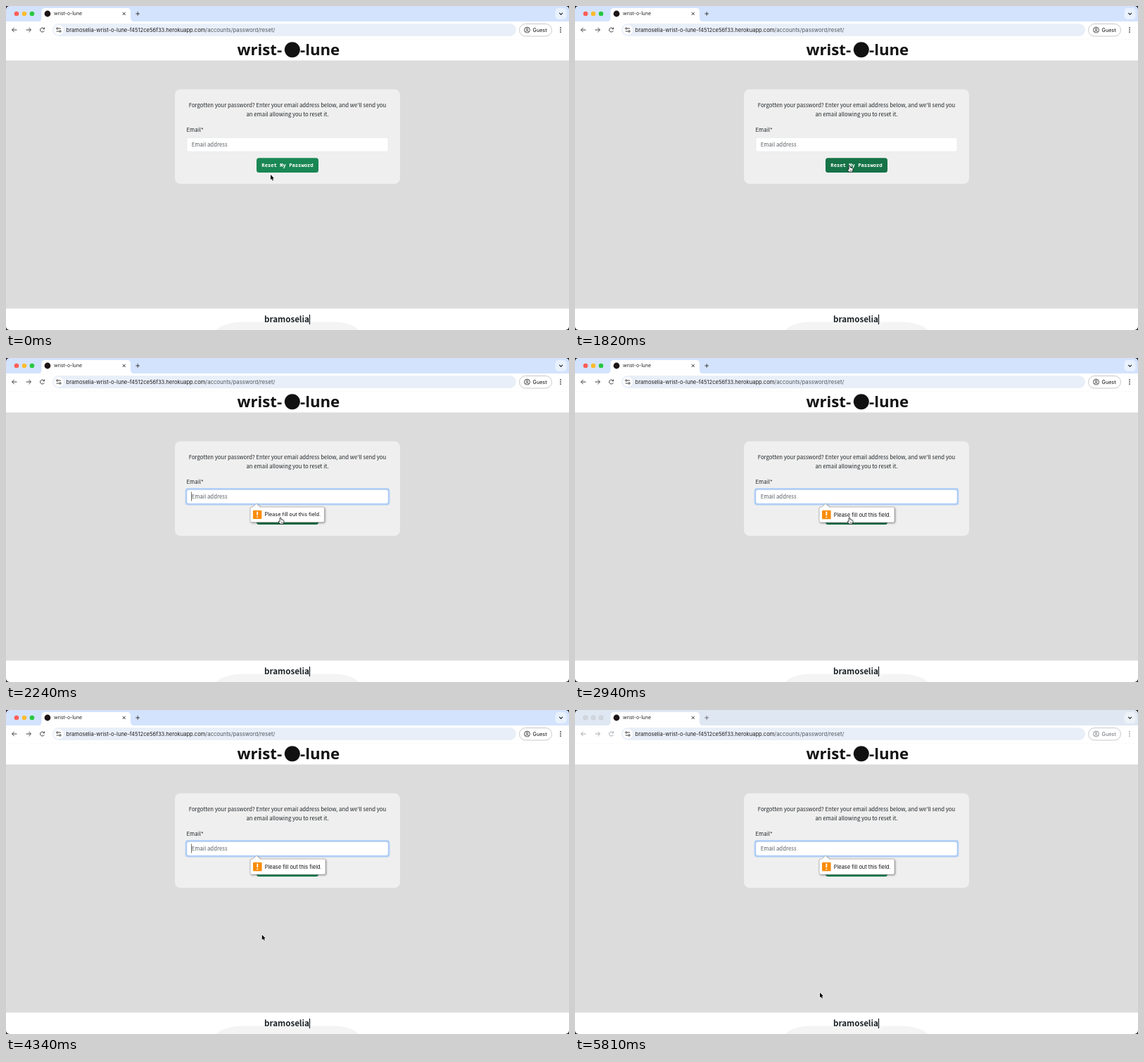
Write an HTML page with a canvas that moves like this. It is 800 by 461 pixels and loops after 5880 ms.

```html
<!DOCTYPE html>
<html lang="en">
<head>
<meta charset="utf-8">
<title>wrist-o-lune</title>
<style>
html, body { margin: 0; width: 100%; height: 100%; overflow: hidden; background: #222; }
canvas { display: block; width: 800px; height: 461px; }
</style>
</head>
<body>
<canvas id="stage"></canvas>
<script>
const W = 800, H = 461, LOOP = 5880, STEP = 70;
const canvas = document.getElementById('stage');
const ratio = window.devicePixelRatio || 1;
canvas.width = W * ratio;
canvas.height = H * ratio;
const c = canvas.getContext('2d');

const UI = 'Inter, Roboto, sans-serif';
const BODY = '"Noto Sans CJK JP", "Noto Sans CJK SC", "Noto Sans CJK", "Open Sans", sans-serif';
const MONO = '"Noto Sans Mono", "DejaVu Sans Mono", monospace';
const LOGO = '"Open Sans", "Noto Sans", sans-serif';

// Pointer legs: start, end, from x,y, to x,y
const legs = [
  [0, 350, 376, 240, 371, 288],
  [840, 1470, 371, 288, 390, 227],
  [3990, 4620, 390, 227, 345, 386],
  [4620, 4830, 345, 386, 348, 402]
];
const FOCUS = 2030, BUBBLE = 2100, BLUR = 5810;
const blinks = [2030, 2520, 3010, 3500, 4060, 4620, 5110, 5600];

const clamp = v => Math.max(0, Math.min(1, v));
const smooth = p => p * p * (3 - 2 * p);

function pointerAt(t) {
  let x = legs[0][2], y = legs[0][3];
  for (const [a, b, x0, y0, x1, y1] of legs) {
    if (t < a) break;
    const p = smooth(clamp((t - a) / (b - a)));
    x = x0 + (x1 - x0) * p;
    y = y0 + (y1 - y0) * p;
  }
  return { x, y };
}

function text(s, x, y, font, color, align = 'left') {
  c.font = font;
  c.fillStyle = color;
  c.textAlign = align;
  c.fillText(s, x, y);
}

function box(x, y, w, h, r, fill, stroke, lw = 1) {
  c.beginPath();
  c.roundRect(x, y, w, h, r);
  if (fill) { c.fillStyle = fill; c.fill(); }
  if (stroke) { c.strokeStyle = stroke; c.lineWidth = lw; c.stroke(); }
}

function dot(x, y, r, color) {
  c.beginPath();
  c.arc(x, y, r, 0, 7);
  c.fillStyle = color;
  c.fill();
}

function arc(x, y, r, from, to, color, lw) {
  c.beginPath();
  c.arc(x, y, r, from, to);
  c.strokeStyle = color;
  c.lineWidth = lw;
  c.stroke();
}

function lines(color, lw, ...paths) {
  c.strokeStyle = color;
  c.lineWidth = lw;
  c.beginPath();
  for (const p of paths)
    for (let i = 0; i < p.length; i += 2) i ? c.lineTo(p[i], p[i + 1]) : c.moveTo(p[0], p[1]);
  c.stroke();
}

function arrowIcon(x, dir, color) {
  lines(color, 1, [x - 3.4 * dir, 34, x + 3.2 * dir, 34],
    [x + 0.4 * dir, 30.9, x + 3.5 * dir, 34, x + 0.4 * dir, 37.1]);
}

function tabBar(active) {
  c.fillStyle = active ? '#d3e3fd' : '#dfe7f3';
  c.fillRect(0, 0, W, 24);
  const lights = active ? ['#ff5f57', '#febc2e', '#28c840'] : ['#d2d7de', '#d2d7de', '#d2d7de'];
  lights.forEach((color, i) => {
    dot(15 + 11 * i, 11, 3.3, color);
    if (!active) arc(15 + 11 * i, 11, 3.3, 0, 7, '#c3c9d1', 0.5);
  });

  // Tab with flared feet
  c.fillStyle = '#fff';
  c.beginPath();
  c.moveTo(46, 22);
  c.quadraticCurveTo(50.5, 22, 50.5, 17);
  c.lineTo(50.5, 8);
  c.quadraticCurveTo(50.5, 3, 55.5, 3);
  c.lineTo(172, 3);
  c.quadraticCurveTo(177, 3, 177, 8);
  c.lineTo(177, 17);
  c.quadraticCurveTo(177, 22, 181.5, 22);
  c.fill();
  dot(59, 11, 4.4, '#1c1416');
  text('wrist-o-lune', 68, 13.2, '6.9px ' + UI, '#1f1f1f');
  lines('#333', 1, [165.7, 9, 169.7, 13], [169.7, 9, 165.7, 13]);
  lines(active ? '#333' : '#666', 0.9, [184.4, 11, 190, 11], [187.2, 8.2, 187.2, 13.8]);
  box(780.5, 3, 16, 16, 5, active ? '#e9f1fe' : '#edf2f8');
  lines('#222', 1.1, [786.2, 9.8, 788.6, 12.2, 791, 9.8]);
}

function toolbar(active) {
  c.fillStyle = '#fff';
  c.fillRect(0, 22, W, 25);
  const ink = active ? '#3c4043' : '#a2a7ad';
  arrowIcon(12, -1, ink);
  arrowIcon(32, 1, ink);
  arc(51.6, 34, 3, 0.4, 5.5, ink, 1);
  lines(ink, 1, [54.6, 30.5, 54.6, 32.8, 52.3, 32.8]);

  box(66, 25, 659, 18, 9, '#e9eff9');
  dot(75, 34, 7, '#fff');
  lines('#333', 0.9, [74.4, 32, 78.2, 32], [71.6, 36, 75.4, 36]);
  arc(72.8, 32, 1.2, 0, 7, '#333', 0.9);
  arc(77, 36, 1.2, 0, 7, '#333', 0.9);
  const host = 'bramoselia-wrist-o-lune-f4512ce56f33.herokuapp.com';
  text(host, 85.5, 36.7, '7.58px ' + UI, '#1f1f1f');
  text('/accounts/password/reset/', 85.5 + c.measureText(host).width, 36.7, '7.75px ' + UI, '#50555b');

  const guest = active ? '#2a2a2a' : '#777b80';
  box(729.5, 25.5, 46, 17.5, 8.7, '#fff', '#b9bcc0', 0.8);
  arc(740.5, 34, 4, 0, 7, guest, 0.8);
  arc(740.5, 32.8, 1.3, 0, 7, guest, 0.8);
  arc(740.5, 38, 2.8, 3.6, 5.8, guest, 0.8);
  text('Guest', 748.6, 36.7, '500 7.1px ' + UI, guest);
  for (const y of [31, 34, 37]) dot(788, y, 0.9, ink);
}

function page() {
  c.fillStyle = '#fff';
  c.fillRect(0, 47, W, H - 47);
  c.fillStyle = '#ececec';
  c.fillRect(0, 46.5, W, 0.7);
  c.fillStyle = '#dcdcdc';
  c.fillRect(0, 77.5, W, 353);

  text('wrist-', 328.5, 70, 'bold 22.2px ' + LOGO, '#111');
  text('-lune', 418, 70, 'bold 22.2px ' + LOGO, '#111');
  dot(406.8, 62.2, 11, '#111');

  c.beginPath();
  c.moveTo(299, H);
  c.quadraticCurveTo(309, 450.5, 335, 449.5);
  c.lineTo(465, 449.5);
  c.quadraticCurveTo(491, 450.5, 501, H);
  c.fillStyle = '#f4f4f4';
  c.fill();
  text('bramoselia', 367, 449.5, 'bold 11.6px ' + BODY, '#1d2124');
  c.fillStyle = '#1d2124';
  c.fillRect(430.8, 439, 1.3, 14);
}

function form(t, hover) {
  const font = '7.79px ' + BODY, ink = '#212529';
  const focused = t >= FOCUS;
  box(240, 118.5, 320, 134.5, 8, '#efefef');
  text("Forgotten your password? Enter your email address below, and we'll send you", 400, 143.7, font, ink, 'center');
  text('an email allowing you to reset it.', 400, 156.7, font, ink, 'center');
  text('Email*', 256.5, 178.5, font, ink);

  if (focused) box(254.6, 185.1, 290.8, 24.4, 4, '#b6cff2');
  box(256.8, 187.3, 286.4, 20, 3, '#fff', focused ? '#86b7fe' : '#dee2e6', 0.6);
  text('Email address', 263.7, 199.8, font, '#595f64');
  const shown = blinks.filter(b => b <= t).length % 2;
  if (shown) {
    c.fillStyle = '#333';
    c.fillRect(263.2, 190.5, 0.7, 13);
  }

  box(356, 216.2, 88, 20.8, 3.5, hover ? '#157347' : '#198754');
  text('Reset My Password', 400, 229.3, 'bold 7.2px ' + MONO, '#fff', 'center');
}

function bubble(t) {
  if (t < BUBBLE) return;
  const p = clamp((t - BUBBLE) / 280);
  const s = 0.94 + 0.06 * p * (2 - p);
  c.save();
  c.globalAlpha = clamp((t - BUBBLE + STEP) / 210);
  c.translate(347, 212);
  c.scale(s, s);
  c.translate(-347, -212);

  c.beginPath();
  c.moveTo(349, 212);
  c.lineTo(350.8, 212);
  c.lineTo(356, 207.2);
  c.lineTo(361.2, 212);
  c.lineTo(452, 212);
  c.arcTo(454, 212, 454, 214, 2);
  c.lineTo(454, 232);
  c.arcTo(454, 234, 452, 234, 2);
  c.lineTo(349, 234);
  c.arcTo(347, 234, 347, 232, 2);
  c.lineTo(347, 214);
  c.arcTo(347, 212, 349, 212, 2);
  c.closePath();
  c.save();
  c.shadowColor = 'rgba(0,0,0,.45)';
  c.shadowBlur = 3 * ratio;
  c.shadowOffsetX = ratio;
  c.shadowOffsetY = ratio;
  c.fillStyle = '#fff';
  c.fill();
  c.restore();
  c.strokeStyle = '#a6a6a6';
  c.lineWidth = 0.7;
  c.stroke();

  box(351, 216.7, 12.6, 12.6, 1.2, '#fb8c0a');
  box(356.4, 218.6, 1.8, 5.4, 0.5, '#fff');
  box(356.4, 225.4, 1.8, 1.9, 0.5, '#fff');
  text('Please fill out this field.', 367.8, 225.5, '7.42px ' + UI, '#111');
  c.restore();
}

function pointer({ x, y }, hand) {
  c.save();
  c.translate(x, y);
  c.lineJoin = 'round';
  c.beginPath();
  if (hand) {
    c.moveTo(-0.9, 0.6);
    c.quadraticCurveTo(0, -0.8, 0.9, 0.6);
    c.lineTo(1.2, 3);
    c.lineTo(4, 3.5);
    c.quadraticCurveTo(5.3, 4, 5, 5.8);
    c.lineTo(4, 9.2);
    c.lineTo(-0.4, 9.2);
    c.lineTo(-3, 5.8);
    c.quadraticCurveTo(-2.4, 4.6, -0.9, 5.6);
    c.closePath();
    c.fillStyle = '#fff';
    c.fill();
    c.strokeStyle = '#111';
    c.lineWidth = 0.8;
    c.stroke();
    lines('#111', 0.5, [1.2, 6, 1.2, 8], [2.6, 6, 2.6, 8]);
  } else {
    const p = [0, 0, 0, 7.2, 1.7, 5.7, 2.8, 8.4, 4, 7.9, 2.9, 5.3, 5, 5.2];
    for (let i = 0; i < p.length; i += 2) c.lineTo(p[i], p[i + 1]);
    c.closePath();
    c.strokeStyle = '#fff';
    c.lineWidth = 1.4;
    c.stroke();
    c.fillStyle = '#000';
    c.fill();
  }
  c.restore();
}

function draw(now) {
  const t = Math.floor((now % LOOP) / STEP) * STEP;
  const active = t < BLUR;
  const at = pointerAt(t);
  const hover = at.x > 356 && at.x < 444 && at.y > 216 && at.y < 237;
  c.setTransform(ratio, 0, 0, ratio, 0, 0);
  c.fillStyle = '#222';
  c.fillRect(0, 0, W, H);
  c.save();
  c.beginPath();
  c.roundRect(0, 0, W, H, 5);
  c.clip();
  tabBar(active);
  page();
  toolbar(active);
  form(t, hover);
  bubble(t);
  pointer(at, hover);
  c.restore();
}

const start = performance.now();
function tick() {
  draw(performance.now() - start);
  requestAnimationFrame(tick);
}
tick();
</script>
</body>
</html>
```
